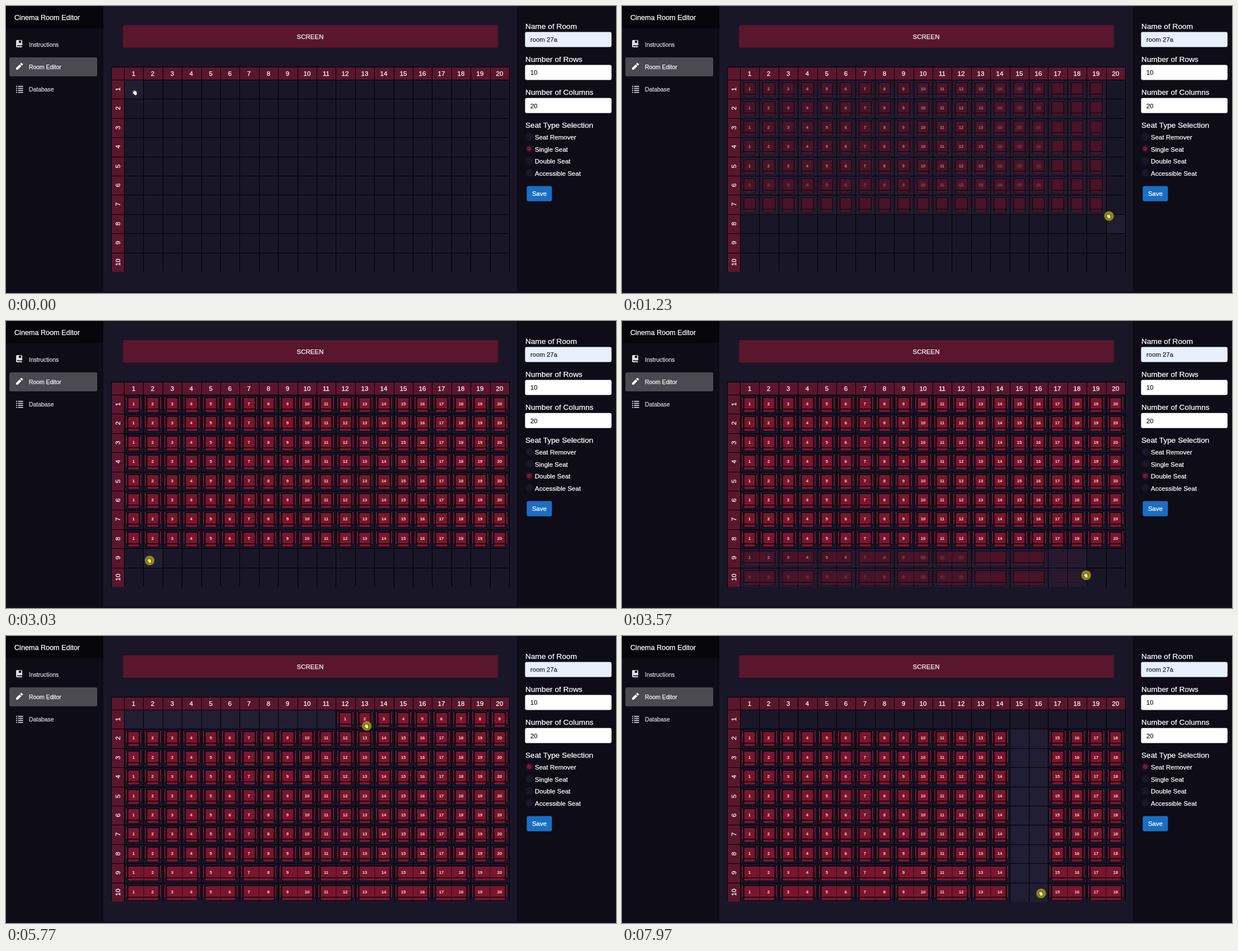
An HTML page with a canvas that plays this animation: 1090x514 px, repeating every 8 s.

```html
<!DOCTYPE html>
<html lang="en">
<head>
<meta charset="utf-8">
<title>Cinema Room Editor</title>
<style>
html, body { margin: 0; width: 100%; height: 100%; overflow: hidden; background: #191627; }
canvas { display: block; }
</style>
</head>
<body>
<canvas id="stage" width="1090" height="514"></canvas>
<script>
const ctx = document.getElementById('stage').getContext('2d');
const LOOP = 8000, COLS = 20, ROWS = 10, PITCH = 34.4, LEFT = 211, TOP = 132, LAG = 50;
const FONT = '"Liberation Sans", Arial, sans-serif';
const MAROON = '#5a162c', RED = '#7b152f', DARK = '#0a0910', CELL = '#191628', LIT = '#211d33';
const SIDE = '#0e0c17', ICON = '#dddce0';
const TOOLS = ['Seat Remover', 'Single Seat', 'Double Seat', 'Accessible Seat'];

// Pointer legs: every one glides to x, y; some drag a tool or pick one.
const leg = (from, to, x, y, extra) => ({ from, to, x, y, ...extra });
const legs = [
  leg(300, 480, 224, 146),
  leg(480, 1480, 894, 384.6, { drag: 1 }),
  leg(1500, 1930, 974, 285),
  leg(2160, 2260, 974, 285, { pick: 2 }),
  leg(2260, 2930, 237, 428),
  leg(3020, 3880, 885, 458, { drag: 2 }),
  leg(3900, 4200, 1074, 42),
  leg(4200, 4600, 1010, 238),
  leg(4700, 4800, 1010, 238, { pick: 0 }),
  leg(4820, 5500, 225, 161),
  leg(5530, 6230, 884, 161, { drag: 0 }),
  leg(6400, 7170, 702, 186),
  leg(7200, LOOP, 749, 461, { drag: 0 })
];
const drags = legs.filter(l => 'drag' in l);

const clamp = v => Math.min(1, Math.max(0, v));
const easeOut = k => 1 - (1 - clamp(k)) ** 2.4;
const colX = c => Math.round(LEFT + PITCH * c);
const rowY = r => Math.round(TOP + PITCH * r);
const cellAt = ([x, y]) => [Math.floor((x - LEFT) / PITCH), Math.floor((y - TOP) / PITCH)];

function pointer(t) {
  let x = 231, y = 155;
  for (const l of legs) {
    if (t <= l.from) break;
    const k = easeOut((t - l.from) / (l.to - l.from));
    x += (l.x - x) * k;
    y += (l.y - y) * k;
  }
  return [x, y];
}

// Note when each drag first reaches every column and row.
for (const d of drags) {
  d.colAt = Array(COLS).fill(Infinity);
  d.rowAt = Array(ROWS).fill(Infinity);
  const start = cellAt(pointer(d.from));
  for (let t = d.from; t < d.to; t += 4) {
    const end = cellAt(pointer(Math.max(d.from, t - LAG)));
    for (let c = start[0]; c <= end[0] && c < COLS; c++) d.colAt[c] = Math.min(d.colAt[c], t);
    for (let r = start[1]; r <= end[1] && r < ROWS; r++) d.rowAt[r] = Math.min(d.rowAt[r], t);
  }
}

// span: cells covered by the seat, 0 when empty
function cellState(c, r, t) {
  const s = { span: 0, lit: false, on: 0, settled: 0 };
  for (const d of drags) {
    const on = Math.max(d.colAt[d.drag === 2 ? c | 1 : c], d.rowAt[r]);
    if (on > t) continue;
    Object.assign(s, { span: d.drag, lit: t < d.to, on, settled: clamp((t - d.to) / 100) });
  }
  return s;
}

function rect(x, y, w, h, fill) {
  ctx.fillStyle = fill;
  ctx.fillRect(x, y, w, h);
}

function round(x, y, w, h, r, fill) {
  ctx.beginPath();
  ctx.roundRect(x, y, w, h, r);
  ctx.fillStyle = fill;
  ctx.fill();
}

function disc(x, y, r, fill) {
  round(x - r, y - r, 2 * r, 2 * r, r, fill);
}

function line(x1, y1, x2, y2, width, color) {
  ctx.beginPath();
  ctx.moveTo(x1, y1);
  ctx.lineTo(x2, y2);
  ctx.lineWidth = width;
  ctx.strokeStyle = color;
  ctx.stroke();
}

function label(str, x, y, size, fill = '#fff', align = 'left') {
  ctx.font = `${size}px ${FONT}`;
  ctx.textAlign = align;
  ctx.fillStyle = ctx.strokeStyle = fill;
  ctx.lineWidth = 0.25;
  ctx.fillText(str, x, y + size * 0.36);
  ctx.strokeText(str, x, y + size * 0.36);
}

function sidebar() {
  rect(0, 0, 174, 514, SIDE);
  rect(0, 0, 174, 40, '#07060b');
  label('Cinema Room Editor', 15, 20, 12.6);
  round(6, 92, 157, 34, 3, '#4b4951');
  ['Instructions', 'Room Editor', 'Database'].forEach((name, i) => {
    label(name, 41, 68.8 + i * 40.1, 10.4, i === 1 ? '#fff' : '#d8d7da');
  });

  round(18, 61, 11, 13, 2, ICON);
  rect(20, 70.5, 9, 1.5, SIDE);
  rect(23, 62, 4, 4, SIDE);

  ctx.lineCap = 'butt';
  line(19, 113, 26, 106, 4.4, '#fff');
  line(26.8, 105.2, 29, 103, 4.4, '#fff');
  rect(18, 111, 3, 3, '#fff');

  for (let i = 0; i < 4; i++) {
    rect(18, 143 + i * 3.6, 2, 1.7, ICON);
    rect(21.5, 143 + i * 3.6, 9, 1.7, ICON);
  }
}

function panel(t) {
  rect(913, 0, 177, 514, SIDE);
  const fields = [['Name of Room', 'room 27a'], ['Number of Rows', '10'], ['Number of Columns', '20']];
  fields.forEach(([name, value], i) => {
    const y = 35.6 + i * 59.2;
    label(name, 928, y, 13.7);
    round(927.5, y + 10.8, 154.5, 27, 3, i ? '#fff' : '#e8f0fe');
    label(value, 937, y + 24.5, 11.4, '#212529');
  });
  label('Seat Type Selection', 928, 213.2, 13.65);
  const chosen = legs.reduce((pick, l) => t >= l.from && 'pick' in l ? l.pick : pick, 1);
  TOOLS.forEach((name, i) => {
    const y = 234.8 + i * 21.6;
    disc(935, y - 0.8, 7, CELL);
    if (i === chosen) disc(935, y - 0.8, 4.2, RED);
    label(name, 945, y + 0.2, 11.55);
  });
  round(930.5, 322.6, 45, 27.2, 3, '#1b6ec2');
  label('Save', 953, 336, 11.5, '#fff', 'center');
}

// Seat numbers sharpen out of a blur; each stage is drawn once and kept.
const digits = new Map();
function number(n, x, y, clarity) {
  const level = Math.round(clarity * 8);
  if (!level) return;
  const key = n * 16 + level;
  if (!digits.has(key)) {
    const tile = document.createElement('canvas');
    tile.width = 30;
    tile.height = 20;
    const g = tile.getContext('2d');
    g.font = `bold 7.8px ${FONT}`;
    g.textAlign = 'center';
    g.fillStyle = '#eadfc6';
    g.globalAlpha = 0.35 + 0.65 * level / 8;
    if (level < 8) g.filter = `blur(${(8 - level) * 0.28}px)`;
    g.fillText(n, 15, 12.6);
    digits.set(key, tile);
  }
  ctx.drawImage(digits.get(key), x - 15, y - 10);
}

function seat(x, y, w) {
  rect(x + 6, y + 4, w - 12, 23, DARK);
  rect(x + 7.6, y + 6, w - 15.2, 19, RED);
  for (const ax of [x + 2, x + w - 6]) {
    rect(ax, y + 2, 4, 25, DARK);
    rect(ax + 1, y + 3.5, 2, 22.5, RED);
  }
  round(x + 6, y + 25.5, w - 12, 6.5, 1, DARK);
  round(x + 7.4, y + 26.8, w - 14.8, 4.2, 1, RED);
  if (w > 40) rect(x + w / 2, y + 6, 1, 26, '#2a0d1a');
}

function row(r, t, hover) {
  const y = rowY(r), h = rowY(r + 1) - y - 1;
  rect(189, y + 1, 22, h, MAROON);
  ctx.save();
  ctx.translate(199.5, y + 17);
  ctx.rotate(-Math.PI / 2);
  label(r + 1, 0, 0, 11.7, '#fff', 'center');
  ctx.restore();

  const cells = Array.from({ length: COLS }, (_, c) => cellState(c, r, t));
  cells.forEach((s, c) => {
    const lit = s.lit || (c === hover[0] && r === hover[1]);
    rect(colX(c) + 1, y + 1, colX(c + 1) - colX(c) - 1, h, lit ? LIT : CELL);
  });
  cells.forEach((s, c) => {
    if (!s.span || c % s.span) return;
    const ghost = 0.52 * clamp((t - s.on) / 60);
    ctx.globalAlpha = ghost + (1 - ghost) * s.settled;
    seat(colX(c), y, colX(c + s.span) - colX(c));
  });
  let n = 0;
  cells.forEach((s, c) => {
    if (!s.span) return;
    ctx.globalAlpha = 0.6 + 0.4 * s.settled;
    number(++n, colX(c) + 17, y + 16, Math.max(s.settled, clamp((t - s.on - 200) / 250)));
  });
  ctx.globalAlpha = 1;
}

function grid(t, at) {
  rect(188, 109, 712, 367, '#000');
  rect(189, 110, 22, 22, MAROON);
  for (let c = 0; c < COLS; c++) {
    rect(colX(c) + 1, 110, colX(c + 1) - colX(c) - 1, 22, MAROON);
    label(c + 1, colX(c) + 17, 120.5, 11.7, '#fff', 'center');
  }
  for (let r = 0; r < ROWS; r++) row(r, t, cellAt(at));
}

function hand(x, y, fill) {
  ctx.lineCap = 'round';
  for (const [color, grow] of [['#15131c', 1.2], [fill, 0]]) {
    for (let i = 0; i < 5; i++) {
      const a = Math.PI * (1.02 + i * 0.17), reach = 4 + Math.sin(i);
      line(x, y + 1.2, x + reach * Math.cos(a), y + 1.2 + reach * Math.sin(a), 1.4 + grow, color);
    }
    disc(x + 0.3, y + 1.9, 2.6 + grow / 2, color);
  }
}

function arrow(x, y, fill) {
  ctx.lineCap = 'butt';
  line(x + 2, y + 5, x + 4.6, y + 10.6, 1.6, fill);
  ctx.beginPath();
  ctx.moveTo(x, y);
  ctx.lineTo(x, y + 9.5);
  ctx.lineTo(x + 6.8, y + 7);
  ctx.fillStyle = fill;
  ctx.fill();
}

function cursor([x, y], pressed) {
  if (pressed) disc(x, y, 8.6, 'rgba(165,160,12,.85)');
  const [c, r] = cellAt([x, y]);
  const overGrid = c >= 0 && c < COLS && r >= 0 && r < ROWS;
  (overGrid ? hand : arrow)(x, y, pressed ? '#f6f3a2' : '#fff');
}

function draw(t) {
  const at = pointer(t);
  const pressed = legs.some(l => ('drag' in l || 'pick' in l) && t >= l.from && t < l.to);
  rect(0, 0, 1090, 514, '#191627');
  round(208.5, 34, 671, 41, 3, '#45152a');
  round(209.5, 35, 669, 39, 3, MAROON);
  label('SCREEN', 543.5, 54.5, 11.5, '#fff', 'center');
  sidebar();
  panel(t);
  rect(0, 511, 1090, 3, '#100e1a');
  grid(t, at);
  cursor(at, pressed);
}

const begin = performance.now();
function frame() {
  draw((performance.now() - begin) % LOOP);
  requestAnimationFrame(frame);
}
frame();
</script>
</body>
</html>
```
